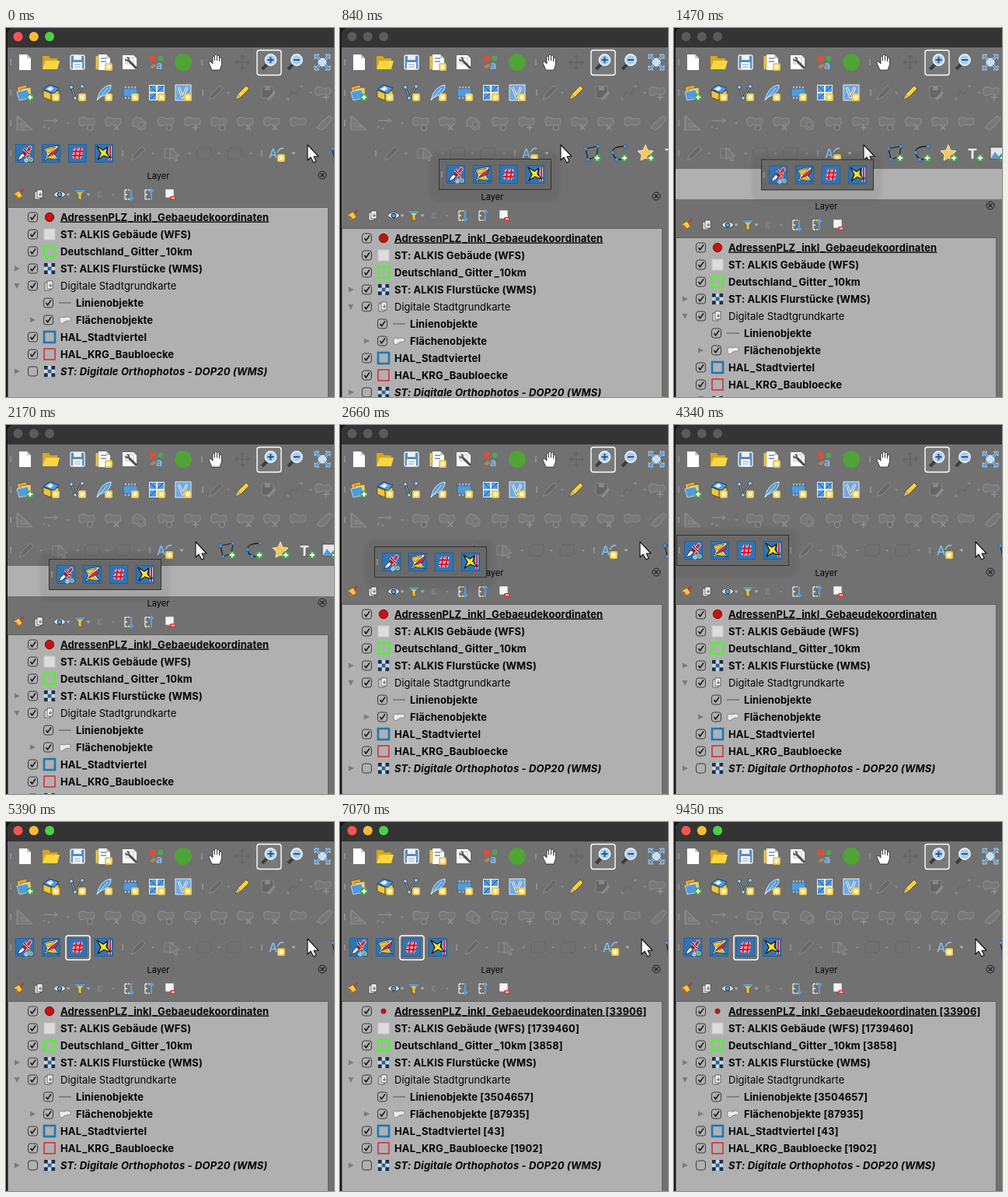
An HTML page that plays this animation: 422 by 474 pixels, repeating every 9.52 s.

```html
<!DOCTYPE html>
<html lang="de">
<head>
<meta charset="utf-8">
<title>Layer panel</title>
<style>
html, body { margin: 0; width: 100%; height: 100%; overflow: hidden; background: #171717; }
svg { display: block; width: 422px; height: 474px; }
text { font: 13px Inter, "Liberation Sans", sans-serif; fill: #050505; white-space: pre; }
.bold { font-weight: 700; letter-spacing: .11px; }
.italic { font-weight: 700; font-style: italic; letter-spacing: .16px; }
.gap { letter-spacing: .8px; }
.under tspan.u { text-decoration: underline; text-decoration-skip-ink: none; }

.anim { animation: 9.52s step-end infinite; }
.focus { animation-name: focus; }
.float { animation-name: drift; }
.box { animation-name: box; }
.shadow { animation-name: shadow; }
.slide { animation-name: slide; }
.panel { animation-name: panel; }
.strip { animation-name: strip; }
.hover2 { animation-name: hover2; }
.hover3 { animation-name: hover3; }
.count { animation-name: count; }
.big { animation-name: big; }
.small { animation-name: small; }

/* one frame is 70 ms of 9520 ms; steps() keeps moves on that grid */
@keyframes focus { 0% { opacity: 1 } 7.3529% { opacity: 0 } 47.7941% { opacity: 1 } }
@keyframes box { 0% { opacity: 0 } 7.3529% { opacity: 1 } 49.2647% { opacity: 0 } }
@keyframes shadow { 0% { opacity: 0 } 7.3529% { opacity: 1 } 47.7941% { opacity: 0 } }
@keyframes drift {
  0% { transform: translate(2px, 141px) }
  7.3529% { transform: translate(95px, 162px); animation-timing-function: steps(2) }
  8.8235% { transform: translate(127px, 168px) }
  12.5% { transform: translate(127px, 168px); animation-timing-function: steps(8) }
  18.3823% { transform: translate(97px, 169px) }
  19.1176% { transform: translate(97px, 169px); animation-timing-function: steps(5) }
  22.7941% { transform: translate(55px, 172px); animation-timing-function: steps(2) }
  24.2647% { transform: translate(55px, 184px) }
  25% { transform: translate(55px, 184px); animation-timing-function: steps(4) }
  27.9411% { transform: translate(44px, 156px); animation-timing-function: steps(10) }
  35.2941% { transform: translate(8px, 143px); animation-timing-function: steps(4) }
  38.2352% { transform: translate(3px, 141px) }
  46.3235% { transform: translate(2px, 141px) }
}
@keyframes slide {
  0% { transform: translateX(0) }
  7.3529% { transform: translateX(0); animation-timing-function: steps(2) }
  8.8235% { transform: translateX(-104px); animation-timing-function: steps(2) }
  10.2941% { transform: translateX(-144px) }
  25% { transform: translateX(-144px); animation-timing-function: steps(2) }
  26.4705% { transform: translateX(-40px); animation-timing-function: steps(2) }
  27.9411% { transform: translateX(-2px) }
  28.6764% { transform: translateX(0) }
}
@keyframes panel {
  0% { transform: translateY(0) }
  7.3529% { transform: translateY(0); animation-timing-function: steps(2) }
  8.8235% { transform: translateY(27px); animation-timing-function: steps(2) }
  10.2941% { transform: translateY(39px) }
  25% { transform: translateY(39px); animation-timing-function: steps(2) }
  26.4705% { transform: translateY(11px); animation-timing-function: steps(2) }
  27.9411% { transform: translateY(0) }
}
@keyframes strip { 0% { opacity: 0 } 10.2941% { opacity: 1 } 25.7352% { opacity: 0 } }
@keyframes hover2 { 0% { opacity: 0 } 49.2647% { opacity: 1 } 50.7352% { opacity: 0 } }
@keyframes hover3 {
  0% { opacity: 0; stroke: #d2d2d2 }
  50.7352% { opacity: 1; stroke: #d2d2d2 }
  55.8823% { opacity: 1; stroke: #fff }
  57.3529% { opacity: 1; stroke: #d2d2d2 }
  74.2647% { opacity: 1; stroke: #fff }
  75.7352% { opacity: 1; stroke: #d2d2d2 }
  88.2352% { opacity: 1; stroke: #fff }
  89.7058% { opacity: 1; stroke: #d2d2d2 }
  99.2647% { opacity: 1; stroke: #fff }
}
@keyframes count {
  0% { fill: transparent } 57.3529% { fill: #050505 }
  75.7352% { fill: transparent } 89.7058% { fill: #050505 }
}
@keyframes big { 0% { opacity: 1 } 57.3529% { opacity: 0 } }
@keyframes small { 0% { opacity: 0 } 57.3529% { opacity: 1 } }
</style>
</head>
<body>
<svg id="stage" viewBox="0 0 422 474"></svg>
<script>
const path = (d, fill = 'none', stroke = 'none', w = 1) =>
  `<path d="${d}" fill="${fill}" stroke="${stroke}" stroke-width="${w}" stroke-linejoin="round"/>`;
const rect = (x, y, w, h, fill, stroke = 'none', sw = 1, rx = 0, cls = '') =>
  `<rect x="${x}" y="${y}" width="${w}" height="${h}" fill="${fill}" stroke="${stroke}" stroke-width="${sw}" rx="${rx}" class="${cls}"/>`;
const dot = (x, y, r, fill, stroke = 'none', w = 1, cls = '') =>
  `<circle cx="${x}" cy="${y}" r="${r}" fill="${fill}" stroke="${stroke}" stroke-width="${w}" class="${cls}"/>`;
const at = (x, y, s) => `<g transform="translate(${x} ${y})">${s}</g>`;
const group = (cls, s) => `<g class="anim ${cls}">${s}</g>`;
const letter = (s, x, y, size, fill, weight = 700) =>
  `<text x="${x}" y="${y}" style="font-size:${size}px;font-weight:${weight};fill:${fill}">${s}</text>`;
const row = (y, items) => items.map(([x, s]) => at(x, y, s)).join('');

const GRAY = '#717171', LIGHT = '#b0b0b0', BLUE = '#2e75b8', SKY = '#4f9be0';
const DIM = '#888', FADE = '#787878', EDGE = '#8b8b8b';

// badges and small marks
const spark = at(6, 6, rect(-5, -5, 10, 10, '#e9c440', 'none', 0, 2) +
  path('M0-4V4M-4 0H4M-3-3L3 3M3-3L-3 3', 'none', '#fffbe0', 1.1));
const plus = at(7, 6, dot(0, 0, 4.8, '#4aa452') + path('M0-3V3M-3 0H3', 'none', '#fff', 1.8));
const caret = path('M-2.5-1.5H2.5L0 2Z', '#b0b0b0');
const faintCaret = path('M-2-1H2L0 2Z', '#8c8c8c');
const grip = path('M0-4V4', 'none', '#a2a2a2', 1.2);

// top rows
const page = path('M-7-10H3L8-5V10H-7Z', '#fff') + path('M3-10V-5H8Z', '#c9c9c9');
const folder = path('M-11-8H-3L-1-5H8V9H-11Z', '#d8a51d') + path('M-11 9L-7-2H11L8 9Z', '#fbd63f');
const floppy = rect(-9, -9, 18, 18, '#5b8cbd', '#e6edf4', 1.4, 2) + rect(-5, -9, 10, 6, '#e9f0f7') +
  rect(-6, 0, 12, 9, '#fff') + path('M-4 3H4M-4 6H4', 'none', '#7b96b2');
const layout = page + path('M-9-8V9M-9-4H-6M-9 2H-6', 'none', '#e6c74e', 3) + path('M-4-5H3M-4-1H3', 'none', '#8aa9c8', 2) + spark;
const manager = path('M-10-9H4L8-5V9H-10Z', '#fff') + path('M-6-6H4V2H-6Z', 'none', '#b9b9b9') +
  path('M-4-4L8 8', 'none', '#4b4b4b', 3) + dot(-4, -4, 3, '#666') + path('M-7-7L-4-4', 'none', '#fff', 2);
const styles = rect(-9, -9, 8, 8, '#d6513a') + dot(5, -5, 3.5, '#54a351') +
  path('M-9 6L-4 2L0 4L-5 8Z', '#b8835a') + letter('a', -1, 9, 14, '#7dbcf2');
const hand = path('M-5 10L-9 1Q-9-2-6 0L-4 2V-7Q-3-9-1.5-7V-2V-9Q0-11 1.5-9V-2V-8Q3-10 4.5-8V-1V-5Q6-7 7.5-5V3L5 10Z', '#fff', '#222', .8);
const cross = path('M0-9V9M-9 0H9M-3-6L0-9L3-6M-3 6L0 9L3 6M-6-3L-9 0L-6 3M6-3L9 0L6 3', 'none', '#646464', 1.4);
const lens = (sign) => path('M-3 3L-9 9', 'none', '#3d3d3d', 4) + dot(2, -3, 7, '#a9cdef', '#e8f0f7', 1.8) +
  path(sign, 'none', '#26588c', 2);
const zoomIn = lens('M2-7V1M-2-3H6'), zoomOut = lens('M-2-3H6');
const zoomFull = dot(0, 0, 5, '#c8def3', '#e8f0f7') +
  path('M-10-4V-10H-4L-6-8L-2-4L-4-2L-8-6ZM10-4V-10H4L6-8L2-4L4-2L8-6ZM-10 4V10H-4L-6 8L-2 4L-4 2L-8 6ZM10 4V10H4L6 8L2 4L4 2L8 6Z', SKY, '#e0edfa', .6);

const sources = path('M-10-7L2-10L5 2L-7 5Z', '#e9a93a', '#5b4a1b', .6) + path('M-5-5L8-7L9 4L-4 7Z', '#e3c85b', '#5b4a1b', .6) +
  path('M-10-1L4-4L7 7L-7 10Z', SKY, '#fff', .6) + plus;
const geopackage = path('M-10-3L0 1L10-3V6L0 10L-10 6Z', '#eec63f', '#4a3a10', .7) +
  path('M-10-4L-2-10L10-6L4 1L0 0Z', SKY, '#173e69') + path('M-6-5L0-8L3-5L-1-2Z', '#eaf3fb') + path('M0 1V10', 'none', '#4a3a10') + spark;
const vector = path('M-8-7L-3 7L6-8', 'none', '#1f2a33', 2.4) + path('M-8-7L-3 7L6-8', 'none', '#d5e4f1', .9) +
  [[-8, -7], [6, -8], [-3, 7]].map(([x, y]) => dot(x, y, 2.3, '#a9d2f7', '#24445f', .8)).join('') + spark;
const feather = path('M-9 10Q-5-8 9-10Q10 0-5 6Z', SKY, '#d7e9fa') + path('M-9 10L5-6', 'none', '#e8f4ff') + spark;
const chip = path('M-6-8V8M-2-8V8M2-8V8M6-8V8', 'none', '#cfe0ef', 1.3) + rect(-9, -5, 18, 10, SKY, '#2b5f92', .7) + spark;
const mesh = rect(-10, -10, 20, 20, '#e4eff9') + rect(-9, -9, 8, 8, SKY) + rect(1, -9, 8, 8, SKY) + rect(-9, 1, 8, 8, SKY) +
  path('M-9-9L-1-1M1-1L9-9M-9 9L-1 1', 'none', '#245482') + spark;
const virtual = rect(-10, -10, 20, 20, '#6fa9e0', '#e4eef8') + path('M-6-7L-1 6L5-7', 'none', '#fff', 3) +
  path('M-6-7L-1 6L5-7', 'none', '#274e75', .8) + spark;
const pencil = (fill, line) => path('M-9 9L-6 2L5-9L9-5L-2 6Z', fill, line) + path('M-9 9L-6 2L-2 6Z', '#d4b897', line, .5);
const dimPencil = path('M-9 9L-6 2L5-9L9-5L-2 6Z', '#6a6865', EDGE);
const dimSave = rect(-9, -8, 15, 15, '#666', DIM, 1, 2) + rect(-5, -8, 7, 5, DIM) + at(4, 4, path('M-5 5L4-5', 'none', '#8d8d8d', 3));
const dimLine = path('M-9 8L-4-1L2 2L8-8', 'none', '#666', 1.3) + dot(-9, 8, 1.8, DIM) + dot(8, -8, 1.8, DIM);

// dim shape tools
const ruler = path('M-9-9L10 9H-9ZM-5 0L4 5H-5Z', FADE, EDGE, 1.2) + path('M-10-9V10', 'none', EDGE, 1.3);
const nodes = path('M-9-3H8M4-6L8-3L4 0', 'none', EDGE, 1.4) + dot(-9, 5, 1.5, DIM) + dot(-3, 7, 1.5, DIM);
const shape = path('M-10 0C-12-8-5-9-1-6S9-10 10-3 3 3 0 2-8 8-10 0Z', FADE, EDGE, 1.1);
const blob = (mark) => shape + at(4, 6, mark);
const ring = dot(0, 0, 3.5, '#6c6c6c', '#8f8f8f', 1.2);
const xMark = path('M-3-3L3 3M3-3L-3 3', 'none', '#929292', 1.5);
const addMark = path('M0-4V4M-4 0H4', 'none', '#929292', 1.5);
const hexes = path('M-9-3L-4-8L2-6L8 0L7 7L1 9L-4 5L-9 4Z', FADE, EDGE, 1.2) + dot(2, 2, 3.5, GRAY, EDGE);
const bottle = path('M-10 6L-5 0L6-9L10-6L3 4L-4 9Z', FADE, EDGE, 1.1);

// label and annotation tools
const dimArrow = path('M-10-6H2V6H-10Z', 'none', DIM, 1.1) + path('M-3-7L9 3L4 4L7 9L4 10L1 5L-3 8Z', FADE, '#929292');
const dimBox = path('M-9-7H9V7H-9Z', 'none', '#676767', 1) + dot(-9, -7, 1.5, FADE) + dot(9, 7, 1.5, FADE);
const annotate = letter('A', -10, 6, 16, '#7fbdf0', 500) + path('M1-1Q5-8 9-6', 'none', '#8fc4f3', 1.4) + spark;
const pointer = path('M-6-11V9L-2 5L2 12L5 10L2 4H8Z', '#fff', '#111', 1.1);
const knots = (pts) => pts.map(([x, y]) => dot(x, y, 2.3, SKY, '#174c84', .6)).join('');
const polygon = path('M-8-6L8-9L6 4L-5 8Z', '#747474', '#1d1d1d', 1.2) + knots([[-8, -6], [8, -9], [6, 4], [-5, 8]]) + plus;
const bezier = path('M8-9Q-10-9-8 0T5 8', 'none', '#1d1d1d', 1.3) + knots([[8, -9], [-8, -1], [-3, 8]]) + plus;
const star = path('M0-11L3-4L10-3L5 2L6 9L0 6L-6 9L-5 2L-10-3L-3-4Z', '#f3c766', '#fff3d0', .8) + plus;
const textTool = letter('T', -9, 7, 18, '#f5f5f5') + plus;
const imageTool = rect(-9, -8, 17, 15, '#e6e6e6', '#444') + path('M-8 6L-3-2L2 4L5 0L8 6Z', SKY) + plus;

// floating toolbar buttons
const tile = rect(-11.5, -11.5, 23, 23, BLUE, '#225b94', .8);
const pipette = tile + path('M-9 9L-7 4L1-4L4-1L-4 7Z', '#f4f4f4', '#3b2024', .9) + path('M-3 0L1-4L4-1L0 3Z', '#a51d28') +
  path('M-1-6L6 1', 'none', '#fff', 3.4) + path('M-1-6L6 1', 'none', '#8d1722', 1.8) +
  path('M2-4L6-9Q9-10 9-6L5-1Z', '#d9202b', '#fff', .8) +
  dot(4, 4, 2.3, '#e62c36', '#fff', .6) + dot(8, 8, 2.3, '#49b04d', '#fff', .6) + dot(2, 9, 2.3, '#78bdf0', '#fff', .6);
const flash = tile + path('M-10-6L-2-8L9-10L8-2L4 1L10 9L1 5L-9 9L-5 1Z', '#fff', '#222', .8) +
  path('M-9-5L6-8L-3 0Z', '#f5c928', '#222', .6) + path('M-5 4L0-1L8-7L7-1L2 2Z', '#df292c', '#222', .6) + path('M-7 6L1 2L8 8Z', '#f5c928', '#222', .6);
const hashLine = 'M-1.5-7L-3.5 7M4-7L2 7M-6-2.5H7M-7 3H6';
const hash = tile + path(hashLine, 'none', '#fff', 4) + path(hashLine, 'none', '#e0142a', 2.3);
const alert = tile + path('M-9-9L-1-4L5-8L3-1L9 7L0 3L-8 8L-4 0Z', '#ffe431', '#141414', 1.3) +
  path('M8-9V3M8 6V9', 'none', '#fff', 3.6) + path('M8-9V3M8 6V9', 'none', '#df1b2b', 2.2);

// layer panel
const brush = path('M-7-1L0-5L4 2L-2 6Z', '#f2cd3d', '#6e5316', .6) + path('M1-3L6-7', 'none', '#c23a2c', 2.6) + path('M-5 0L0 6', 'none', '#d24532', 1.4);
const stack = path('M-6-4H1V6H-6Z', '#e8e8e8', '#444', .8) + path('M-3-6H4V4H-3Z', '#f5f5f5', '#444', .8) + path('M1-3V2M-1 0H3', 'none', '#555');
const eye = path('M-8 0Q0-9 8 0Q0 8-8 0Z', '#f3f3f3', '#333', .8) + dot(0, 0, 3, SKY, '#222');
const filter = path('M-7-6H7L2 0V7L-2 5V0Z', '#e8c242', '#6b5413', .7) + path('M-7-6H7L5-3H-5Z', SKY);
const fold = (d) => path('M-6-6V6M-6-6H-3M-6 0H-3M-6 6H-3', 'none', '#e8e8e8', 1.3) + path('M2-7V7M' + d, 'none', '#55a2e8', 2) + path('M-2-6H0M-2 6H0', 'none', '#f0cd4a', 2);
const removeIcon = rect(-6, -7, 11, 11, '#f4f4f4', '#777', .7) + rect(0, 2, 8, 5, '#d83b3b', 'none', 0, 1.5) + path('M2 4.5H6', 'none', '#fff', 1.4);
const closeIcon = dot(0, 0, 5, 'none', '#222', 1) + path('M-2.5-2.5L2.5 2.5M2.5-2.5L-2.5 2.5', 'none', '#222', 1.2);
const frame = (col, w) => rect(-7, -7, 14, 14, 'none', col, w);
const checker = rect(-7, -7, 14, 14, '#c6d6e6') + [0, 1, 2, 3, 4, 5, 6, 7, 8].map(i => i % 2 ? '' :
  rect(-7 + (i % 3) * 4.7, -7 + Math.floor(i / 3) * 4.7, 4.7, 4.7, i === 4 ? '#2f6290' : '#1e2f40')).join('');
const redDot = dot(0, 0, 5.7, '#c81111', '#5f1111', .9, 'anim big') + dot(0, 0, 3.1, '#c91313', '#6b1414', .8, 'anim small');
const area = path('M-7-2Q-6-5-2-3Q4-5 7-3Q8 2 4 1Q0 1-4 5Q-8 4-7-2Z', '#ececec', '#777', .8);

const check = (on) => rect(-6, -6, 12, 12, 'none', '#383838', 1, 3) +
  (on ? path('M-3 0L-1 3L3.5-3.5', 'none', '#111', 1.4) : '');
const arrows = { closed: path('M-3-3.5L4 0L-3 3.5Z', '#7c7c7c'), open: path('M-3.5-3H3.5L0 4Z', '#7c7c7c') };

// label, style, icon, count, indent, arrow
const layers = [
  ['AdressenPLZ_inkl_Gebaeudekoordinaten', 'bold under', redDot, 33906, 0, ''],
  ['ST: ALKIS Gebäude (WFS)', 'bold', rect(-7, -7, 14, 14, '#dcdcdc', '#c8c8c8'), 1739460, 0, ''],
  ['Deutschland_\u200aGitter\u200a_10km', 'bold', frame('#4df52c', 2.6), 3858, 0, ''],
  ['ST: ALKIS Flurstücke (WMS)', 'bold', checker, 0, 0, 'closed'],
  ['Digitale Stadtgrundkarte', '', stack, 0, 0, 'open'],
  ['Linienobjekte', 'bold', path('M-8 0H8', 'none', '#555', 1), 3504657, 20, ''],
  ['Flächenobjekte', 'bold', area, 87935, 20, 'closed'],
  ['HAL_Stadtviertel', 'bold', frame('#1f78b4', 2.6), 43, 0, ''],
  ['HAL_KRG_Baubloecke', 'bold', frame('#d9202c', 1.4), 1902, 0, ''],
  ['ST: Digitale Orthophotos - DOP20 (WMS)', 'italic', checker, 0, 0, 'closed'],
];
const layerRow = ([label, cls, icon, n, indent, arrow], i) => {
  const name = label.replace(/_/g, '<tspan class="gap" dx=".8">_</tspan>');
  const count = n ? `<tspan class="u anim count"> [${n}]</tspan>` : '';
  return at(indent, 243 + 22 * i, at(14, 0, arrows[arrow] || '') + at(34.5, 0, check(i < 9)) +
    at(56, 0, icon) + `<text x="70" y="4.5" class="${cls}"><tspan class="u">${name}</tspan>${count}</text>`);
};

const lights = (cols) => cols.map((c, i) => dot(15.5 + 20.3 * i, 11, 6, c)).join('');

const rows =
  row(44, [[6, grip], [24, page], [58, folder], [92, floppy], [126, layout], [160, manager], [194, styles],
    [228, dot(0, 0, 11, '#4fa435')], [252, grip], [270, hand], [304, cross],
    [338.5, rect(-15.5, -15.5, 31, 32, '#797979', '#fff', 1.4, 3) + zoomIn], [372, zoomOut], [407, zoomFull]]) +
  row(83, [[6, grip], [24, sources], [58, geopackage], [92, vector], [126, feather], [160, chip], [194, mesh], [228, virtual],
    [253, grip], [270, dimPencil], [286, faintCaret], [304, pencil('#f4cf45', '#6b5312')], [338, dimSave], [372, dimLine],
    [392, faintCaret], [408, blob(addMark)]]) +
  row(122, [[6, grip], [24, ruler], [58, nodes], [80, faintCaret], [104, blob(ring)], [138, blob(xMark)], [172, hexes],
    [206, blob(ring)], [240, blob(addMark)], [274, blob(ring)], [308, blob(xMark)], [342, blob(xMark)], [376, shape], [410, bottle]]);

const annotations = row(161, [[150, grip], [170, dimPencil], [189, faintCaret], [214, dimArrow], [236, faintCaret], [255, dimBox],
  [274, faintCaret], [294, dimBox], [315, faintCaret], [329, grip], [348, annotate], [370, caret], [394, pointer],
  [428, polygon], [463, bezier], [497, star], [531, textTool], [560, imageTool]]);

const panel = rect(2, 181, 420, 340, GRAY) + rect(2.5, 230.5, 412, 290, LIGHT, '#555', .8) +
  '<text x="196" y="193.5" text-anchor="middle" style="font-size:11px">Layer</text>' + at(407, 189, closeIcon) +
  row(214, [[17, brush], [43, stack], [69, eye], [80, caret], [95, filter], [106, caret],
    [122, letter('ε', -5, 4, 13, '#858585')], [138, faintCaret], [159, fold('-1 4L2 7L5 4')], [185, fold('-1-4L2-7L5-4')], [211, removeIcon]]) +
  layers.map(layerRow).join('');

const toolbar = group('shadow', '<rect x="-12" y="-9" width="168" height="64" rx="14" fill="#000" opacity=".06" filter="url(#soft)"/>') +
  rect(.5, .5, 144, 39, '#696969', '#303030', 1, 0, 'anim box') +
  row(20, [[4, grip], [22, pipette], [56, flash], [90, hash], [124, alert]]);

const hoverBox = (x, cls) => rect(x, 146, 31, 31, 'none', '#d2d2d2', 1.5, 3, 'anim ' + cls);

document.getElementById('stage').innerHTML =
  '<defs><filter id="soft"><feGaussianBlur stdDeviation="2"/></filter></defs>' +
  rect(0, 0, 422, 474, '#171717') +
  path('M2 474V10Q2 0 12 0H422V474Z', GRAY) + path('M2 25V10Q2 0 12 0H422V25Z', '#343434') +
  lights(['#5b5b5b', '#5b5b5b', '#5b5b5b']) + group('focus', lights(['#fb5452', '#f8bb32', '#48d347'])) +
  rows + group('slide', annotations) +
  rect(2, 181, 420, 40, LIGHT, 'none', 0, 0, 'anim strip') +
  group('panel', panel) + group('float', toolbar) +
  hoverBox(43, 'hover2') + hoverBox(77, 'hover3');
</script>
</body>
</html>
```
